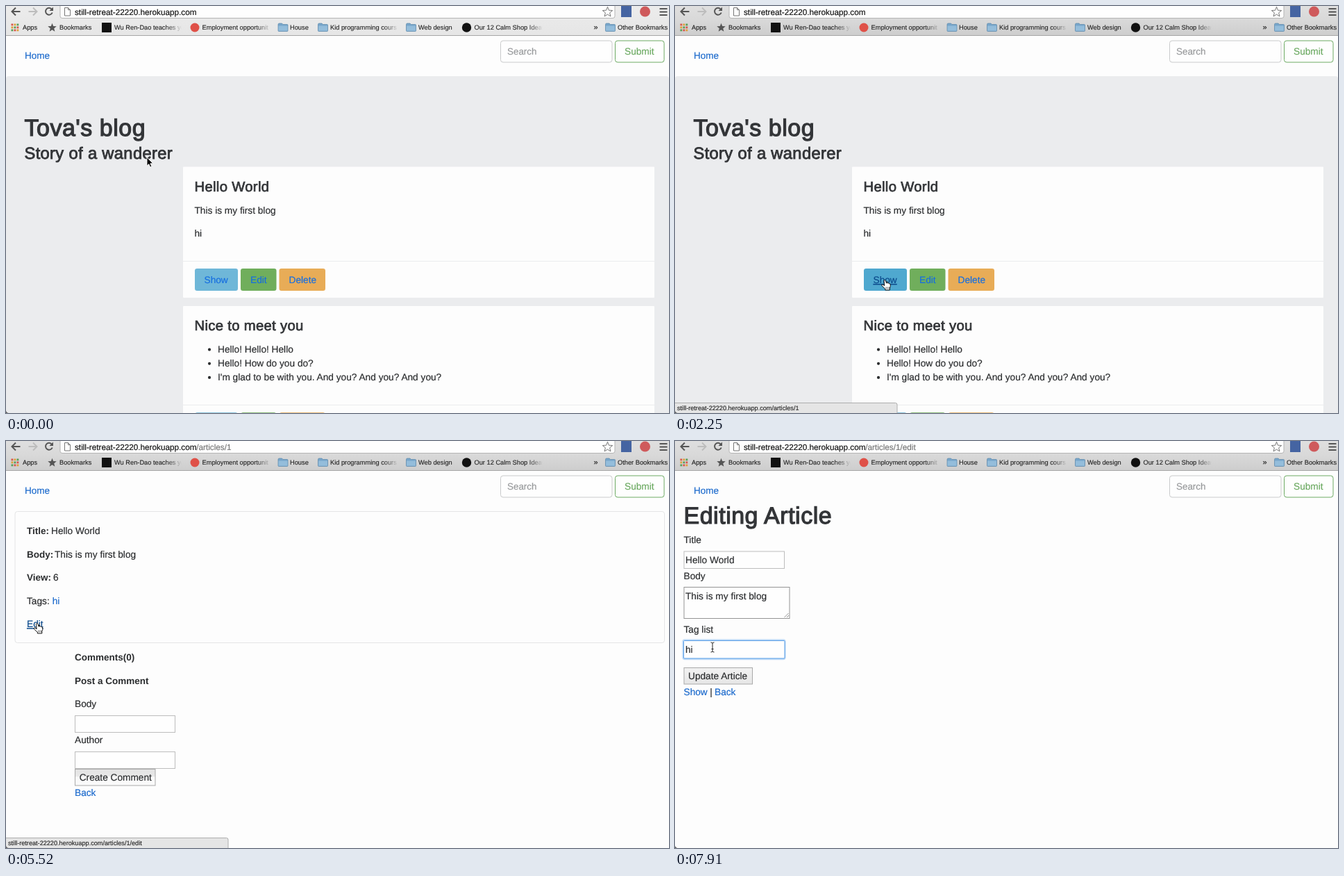
Recreate the animation shown at these times as an HTML page. Size 955 by 586 pixels, loop 8 s.

```html
<!DOCTYPE html>
<html lang="en">
<head>
<meta charset="utf-8">
<title>Blog walkthrough</title>
<style>
html, body { margin: 0; width: 100%; height: 100%; overflow: hidden; background: #fdfdfd; }
svg { display: block; }
text { font-family: "Liberation Sans", Arial, sans-serif; text-rendering: geometricPrecision; white-space: pre; }
</style>
</head>
<body>
<svg id="stage" width="955" height="586" viewBox="0 0 955 586"></svg>
<script>
const LOOP = 8000;
const INK = '#2b2d2f', LINK = '#1a69cc', LINK_DARK = '#0b4a8c', LABEL = '#176fe0';
const stage = document.getElementById('stage');
let parent = stage;

function add(name, attrs, content) {
  const el = document.createElementNS('http://www.w3.org/2000/svg', name);
  for (const key in attrs) el.setAttribute(key, attrs[key]);
  if (content !== undefined) el.textContent = content;
  parent.appendChild(el);
  return el;
}

function group(build) {
  const outer = parent;
  const g = parent = add('g', {});
  build();
  parent = outer;
  return g;
}

const rect = (x, y, w, h, fill, extra) =>
  add('rect', { x, y, width: w, height: h, fill, ...extra });
const box = (x, y, w, h, stroke, rx = 0, fill = '#fefefe') =>
  rect(x, y, w, h, fill, { stroke, rx });
const path = (d, fill, extra) => add('path', { d, fill, ...extra });
const line = (d, stroke, width = 1, extra) =>
  path(d, 'none', { stroke, 'stroke-width': width, ...extra });
const dot = (cx, cy, r, fill) => add('circle', { cx, cy, r, fill });

// A hairline stroke gives the slightly heavier smoothing of the desktop
const text = (x, y, str, fill = INK, size = 13.7, extra) =>
  add('text', { x, y, fill, 'font-size': size, stroke: fill, 'stroke-width': size * 0.014, ...extra }, str);
const bold = (x, y, str) => text(x, y, str, INK, 13.5, { 'font-weight': 700, 'stroke-width': 0 });

// Regular face thickened to a medium weight
const heading = (x, y, str, size) => text(x, y, str, '#333538', size, {
  'stroke-width': size * 0.036, 'letter-spacing': size * 0.015
});

function gradient(id, stops, coords) {
  const outer = parent;
  parent = add('linearGradient', { id, ...coords });
  for (const [offset, color, opacity = 1] of stops)
    add('stop', { offset, 'stop-color': color, 'stop-opacity': opacity });
  parent = outer;
  return `url(#${id})`;
}
const DOWN = { x1: 0, y1: 0, x2: 0, y2: 1 };

function star(cx, cy, r, fill, stroke) {
  let d = '';
  for (let i = 0; i < 10; i++) {
    const a = i * Math.PI / 5 - Math.PI / 2, q = i % 2 ? r * 0.43 : r;
    d += (i ? 'L' : 'M') + (cx + q * Math.cos(a)).toFixed(2) + ' ' + (cy + q * Math.sin(a)).toFixed(2);
  }
  path(d + 'Z', fill, { stroke });
}

function folder(x) {
  path(`M${x} 26.5q0-1.500 1.500-1.500h4l1.500 1.500h6q1 0 1 1v8q0 1-1 1h-12q-1 0-1-1z`, '#78a6ca',
    { stroke: '#5b87aa', 'stroke-width': 0.7 });
  rect(x + 0.6, 28.6, 12.8, 7.2, '#94bddb');
}

function arrowIcon(x, dir, color) {
  line(`M${x} 8H${x + 12 * dir}M${x + 5.5 * dir} 2.500L${x} 8l${5.5 * dir} 5.500`, color, 2);
}

const BM = 9.28;
function bookmark(x, str, end) {
  const fill = end
    ? gradient('fade' + x, [[0, '#222'], [1, '#222', 0]],
        { gradientUnits: 'userSpaceOnUse', x1: end - 22, x2: end, y1: 0, y2: 0 })
    : '#222';
  text(x, 34.3, str, fill, BM);
}

let idleBar;
function toolbar() {
  rect(0, 0, 955, 42, gradient('bar', [[0, '#dfdfdf'], [0.45, '#d9d9d9'], [1, '#cecece']], DOWN));
  idleBar = rect(0, 0, 955, 42, gradient('idle', [[0, '#ececec'], [1, '#e6e6e6']], DOWN));
  rect(0, 42, 955, 1, '#a6a6a6');
  arrowIcon(8.5, 1, '#555');
  arrowIcon(44.5, -1, '#bdbdbd');
  line('M66 4.600A5 5 0 1 0 66.700 9.500', '#555', 2);
  path('M68 1.500v5.500h-5.500z', '#555');
  rect(78, -4, 799, 21.5, '#fefefe', { stroke: '#b4b4b4', rx: 3 });
  line('M84.500 2.500h5l3 3v8.500h-8zM89.500 2.500v3h3', '#777');
  star(866.5, 8.8, 7.6, '#fefefe', '#777');
  rect(886, 0, 15, 16, '#4564a2');
  dot(920.5, 8, 7.5, '#cf5a5c');
  for (const y of [3, 7.5, 12]) rect(941.5, y, 11, 2, '#555');

  const tints = ['#d9564b', '#e0a03a', '#5a9e57'];
  for (let i = 0; i < 9; i++)
    rect(7.5 + i % 3 * 4, 25.5 + (i / 3 | 0) * 4, 2.8, 2.8, tints[(i % 3 + (i / 3 | 0)) % 3]);
  bookmark(24, 'Apps');
  star(66.5, 31.3, 6.6, '#555', 'none');
  bookmark(77, 'Bookmarks');
  rect(138, 24, 14, 14, '#111');
  bookmark(156, 'Wu Ren-Dao teaches yo', 253);
  dot(272, 31, 6.5, '#df5148');
  bookmark(282.5, 'Employment opportunit', 381);
  folder(392);
  bookmark(409, 'House');
  folder(449.5);
  bookmark(467, 'Kid programming cours', 565);
  folder(576.5);
  bookmark(594, 'Web design');
  dot(663.5, 31, 6.7, '#111');
  bookmark(674.5, 'Our 12 Calm Shop Ideas', 773);
  text(846.5, 34.3, '»', '#222', 11);
  folder(863.5);
  bookmark(881, 'Other Bookmarks');
  text(99, 12.6, 'still-retreat-22220.herokuapp.com', '#111', 11.74);
  return text(274.3, 12.6, '', '#777', 11.74);
}

function nav() {
  text(27, 76.3, 'Home', LINK, 13.5);
  box(712.5, 50, 160.5, 31, '#c9cacb', 3.5);
  text(722, 70.3, 'Search', '#989a9c', 13.4);
  box(877.5, 50, 70.5, 31, '#6caa62', 3.5);
  text(891, 70.3, 'Submit', '#6caa62', 13.7);
}

function buttons(y) {
  const show = rect(272, y, 62, 32, '#6fb7d8', { rx: 3.3 });
  rect(338, y, 51.5, 32, '#70ae5c', { rx: 3.3 });
  rect(393.5, y, 66.5, 32, '#e8ac57', { rx: 3.3 });
  const label = text(285.5, y + 21, 'Show', LABEL);
  text(352, y + 21, 'Edit', LABEL);
  text(407.5, y + 21, 'Delete', LABEL);
  return { show, label };
}

let hover;
function homePage() {
  path('M0 586V105q0-4 4-4H951q4 0 4 4V586z', '#ebecee');
  heading(26.5, 186.5, "Tova's blog", 34);
  heading(26.5, 220, 'Story of a wanderer', 23.7);
  rect(255, 231.5, 679, 188.5, '#fdfdfd', { rx: 1 });
  heading(271.5, 266.7, 'Hello World', 20.3);
  text(271.5, 298.7, 'This is my first blog');
  text(271.5, 332, 'hi');
  rect(255, 367, 679, 1, '#ebecee');
  hover = buttons(378);
  rect(255, 432, 679, 160, '#fdfdfd', { rx: 1 });
  heading(271.5, 467.2, 'Nice to meet you', 20.3);
  ['Hello! Hello! Hello', 'Hello! How do you do?', "I'm glad to be with you. And you? And you? And you?"]
    .forEach((str, i) => {
      dot(293, 494.7 + i * 20.1, 2.1, INK);
      text(305, 498.8 + i * 20.1, str);
    });
  rect(255, 574, 679, 1, '#ebecee');
  buttons(585.3);
}

let editLink;
function articlePage() {
  box(13, 101.5, 935.5, 189, '#e4e5e6', 3.5, '#fdfdfd');
  const rows = [['Title:', 65, 'Hello World'], ['Body:', 70, 'This is my first blog'], ['View:', 68, '6']];
  rows.forEach(([name, x, value], i) => {
    bold(30, 134 + i * 33.5, name);
    text(x, 134 + i * 33.5, value);
  });
  text(30, 234.6, 'Tags:');
  text(66.7, 234.6, 'hi', LINK);
  editLink = text(30, 268.2, 'Edit', LINK);
  bold(99, 316, 'Comments(0)');
  bold(99, 349.6, 'Post a Comment');
  text(99, 383.1, 'Body');
  box(99.5, 395.5, 144, 24, '#bdbdbd');
  text(99, 435.2, 'Author');
  box(99.5, 447.5, 144, 24, '#bdbdbd');
  box(99.5, 472.5, 115.5, 23.5, '#a9a9a9', 0,
    gradient('press', [[0, '#e3e3e3'], [0.42, '#e8e8e8'], [0.5, '#fafafa']], DOWN));
  text(105.7, 488.8, 'Create Comment');
  text(99, 511.4, 'Back', LINK);
}

let ring, caret;
function editPage() {
  heading(12.5, 119, 'Editing Article', 34);
  text(12.5, 147, 'Title');
  box(13, 159, 144.5, 24.5, '#bdbdbd');
  text(15, 176, 'Hello World');
  text(12.5, 199, 'Body');
  box(13, 210.5, 152, 45, '#949494');
  text(15, 228.3, 'This is my first blog');
  line('M157.500 254l6-6M161 254l3-3', '#777', 0.8);
  text(12.5, 276, 'Tag list');
  box(13, 288.5, 144.5, 24, '#bdbdbd');
  ring = group(() => {
    rect(12, 287, 146, 26.5, 'none', { rx: 2, stroke: '#8fc0f2', 'stroke-width': 3.4, 'stroke-opacity': 0.55 });
    box(12.5, 287.5, 145.5, 25.5, '#549be6', 1);
  });
  text(15, 305.2, 'hi');
  caret = rect(25, 292, 1, 16, '#222');
  box(13, 326.5, 98.5, 23.5, '#a9a9a9', 0, gradient('button', [[0, '#f2f2f2'], [1, '#e6e6e6']], DOWN));
  text(19, 343, 'Update Article');
  text(12.5, 365.5, 'Show', LINK);
  text(50.2, 365.5, '|');
  text(57, 365.5, 'Back', LINK);
}

const rim = { stroke: '#fff', 'stroke-width': 0.9, 'stroke-linejoin': 'round' };
const pointers = {
  arrow: () => path('M0 0V12.200L2.800 9.600L4.700 14L6.800 13.100L4.900 8.800H8.800Z', '#000', rim),
  hand: () => {
    path('M0 1.200Q1.300-.5 2.300 1.200L3.600 5.200Q5 0 5 5Q6.800 4.200 7.200 5.600Q9 5.200 9.200 7Q9.800 9.500 8.300 12V15H1.800V13.300L-3.200 8.600Q-3.600 6.600-1.700 7L.6 8.700Z',
      '#fff', { stroke: '#111', 'stroke-linejoin': 'round' });
    line('M3 10.500v3M5 10.500v3M7 10.500v3', '#333', 0.7);
  },
  beam: () => line('M-2.500-7Q0-7 0-5.500V5.500Q0 7-2.500 7M2.500-7Q0-7 0-5.500M0 5.500Q0 7 2.500 7M-1.500 2.500h3', '#222')
};

// Assemble the layers
rect(0, 0, 955, 586, '#fdfdfd');
const pages = [homePage, articlePage, editPage].map(group);
group(nav);
const urlPath = toolbar();
let bubbleText;
const bubble = group(() => {
  path('M-1 571.500H317.500q2.500 0 2.500 2.500V587H-1z', '#e5e5e5', { stroke: '#adadad' });
  bubbleText = text(3, 581.8, '', '#222', 9.15);
});
path('M0 582.500q.5 3 3.500 3.500H0z', '#555');
const shapes = {};
for (const kind in pointers) shapes[kind] = group(pointers[kind]);

// Each run: start, interval, then pointer kind and position per step
const runs = [
  [0, 150, ['arrow', 203, 218]],
  [150, 151.7, ['arrow', 209, 228], ['arrow', 232, 262], ['arrow', 266, 312], ['arrow', 297, 355],
    ['arrow', 315, 383], ['arrow', 307, 393], ['arrow', 299.5, 393.5], ['arrow', 300.3, 394.3]],
  [1950, 150, ['hand', 301, 394]],
  [3450, 150, ['arrow', 300.3, 394.3]],
  [4050, 147, ['arrow', 283, 362], ['arrow', 238, 290], ['arrow', 182, 212], ['arrow', 128, 158],
    ['arrow', 88, 138], ['arrow', 64, 162], ['arrow', 51, 204], ['arrow', 46, 237]],
  [5220, 150, ['arrow', 43, 254], ['hand', 43.5, 260], ['hand', 43.5, 262]],
  [6270, 150, ['arrow', 43.5, 262]],
  [6570, 148, ['beam', 51, 248], ['arrow', 60, 271], ['arrow', 62, 285.5], ['beam', 57, 294], ['beam', 54, 297]]
];

const bubbleFades = [
  [0, 0], [1950, 0.3], [2100, 0.75], [2250, 1],
  [4050, 0.8], [4200, 0.5], [4350, 0.18], [4500, 0],
  [5220, 0.3], [5370, 0.75], [5520, 1],
  [6570, 0.8], [6715, 0.5], [6860, 0.18], [7010, 0]
];
const hoverTints = [[0, '#6fb7d8'], [1950, '#62b1d5'], [2100, '#55abd1'], [2250, '#4fa8cf']];
const latest = (keys, t) => keys.filter(k => k[0] <= t).pop();
const show = (el, on) => el.style.display = on ? '' : 'none';
function linkState(el, on, rest) {
  for (const key of ['fill', 'stroke']) el.setAttribute(key, on ? LINK_DARK : rest);
  el.setAttribute('text-decoration', on ? 'underline' : 'none');
}

function draw(t) {
  const page = t < 3450 ? 0 : t < 6270 ? 1 : 2;
  pages.forEach((el, i) => show(el, i === page));
  urlPath.textContent = ['', '/articles/1', '/articles/1/edit'][page];

  // The window gains focus with the first click
  show(idleBar, t < 1510);
  hover.show.setAttribute('fill', latest(hoverTints, t)[1]);
  linkState(hover.label, t >= 1950, LABEL);
  linkState(editLink, t >= 5367, LINK);
  show(ring, t >= 7460);
  show(caret, t >= 7460 && t < 7910);

  bubble.setAttribute('opacity', latest(bubbleFades, t)[1]);
  bubbleText.textContent = 'still-retreat-22220.herokuapp.com/articles/1' + (t >= 5220 ? '/edit' : '');

  const [start, gap, ...steps] = latest(runs, t);
  const [kind, x, y] = steps[Math.min(steps.length - 1, Math.floor((t - start) / gap))];
  for (const k in shapes) show(shapes[k], k === kind);
  shapes[kind].setAttribute('transform', `translate(${x} ${y})`);
}

const began = performance.now();
function tick() {
  draw((performance.now() - began) % LOOP);
  requestAnimationFrame(tick);
}
tick();
</script>
</body>
</html>
```
